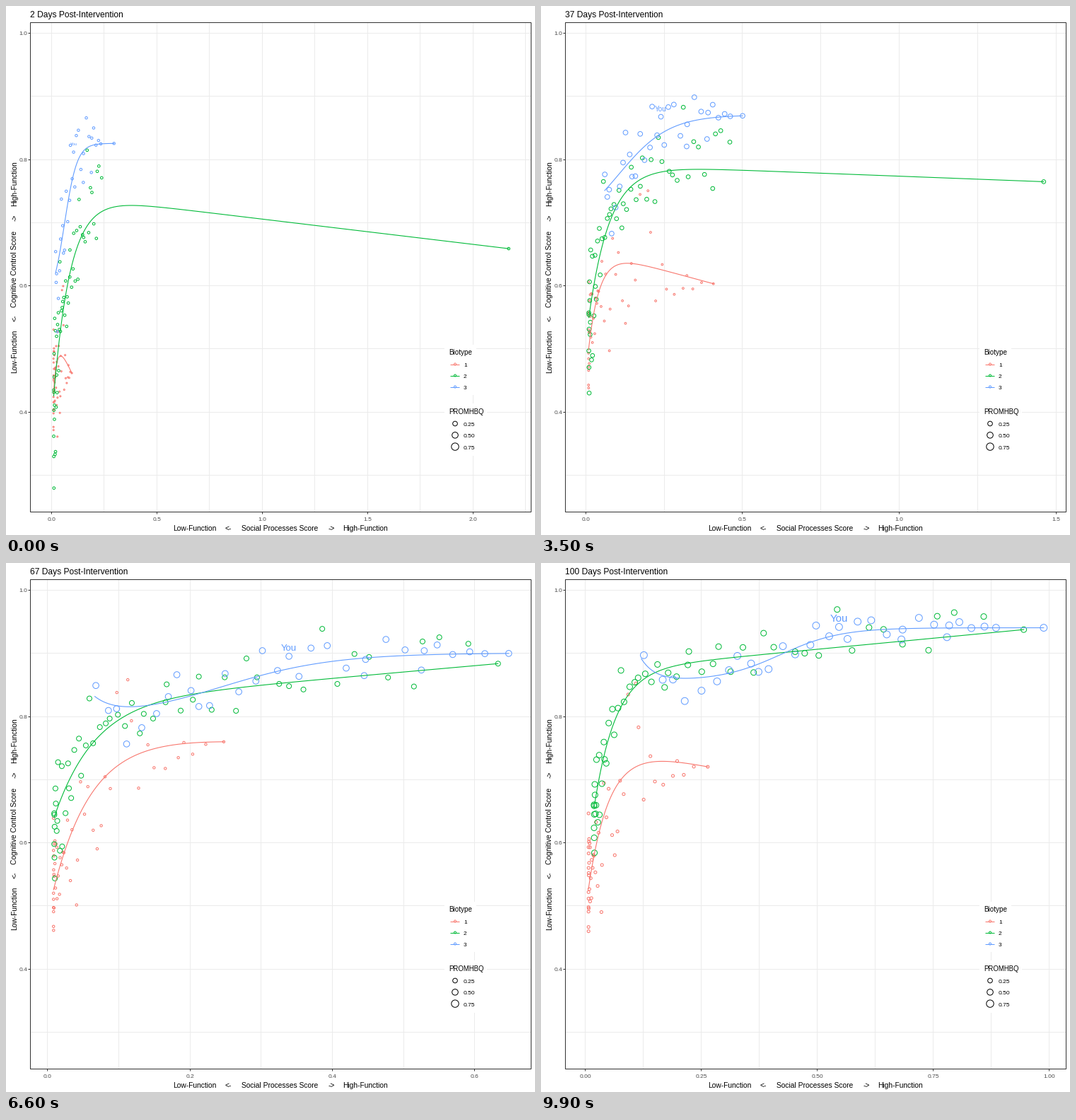
A matplotlib script for the animation above (10000 ms loop, 748 by 748 pixels).

```python
import numpy as np
import matplotlib.pyplot as plt
from matplotlib.animation import FuncAnimation
from matplotlib.collections import LineCollection
from matplotlib.patches import Rectangle

plt.rcParams["font.family"] = "Liberation Sans"

SIZE, DPI, FRAMES = 748, 100, 100
PT = 72 / DPI                                         # points per pixel
LEFT, RIGHT, TOP, BOTTOM = 34.5, 742.5, 22.5, 714.5   # panel
GRID, DARK, TICK = "#ebebeb", "#333333", "#4d4d4d"
RED, GREEN, BLUE = "#f8766d", "#00ba38", "#619cff"

# Trend parameters at these frames, interpolated between them
KEYS = [0, 12, 27, 43, 66, 84, 99]

# columns: first x, last x, first y, plateau, slope, rise length
RED_KEYS = [
    (.008, .095, .428, .530, -.72, .016),
    (.008, .115, .470, .587, -.80, .020),
    (.008, .377, .490, .598, -.09, .020),
    (.008, .435, .505, .717, -.18, .050),
    (.008, .247, .525, .775, -.05, .055),
    (.007, .280, .503, .778, -.19, .045),
    (.006, .263, .527, .760, -.15, .045),
]
GREEN_KEYS = [
    (.009, 2.168, .425, .745, -.040, .080),
    (.009, 2.155, .469, .753, -.029, .059),
    (.009, 1.620, .548, .777, -.018, .072),
    (.009, 1.297, .550, .807, -.020, .062),
    (.009, .632, .640, .820, .100, .056),
    (.009, .797, .612, .850, .090, .042),
    (.018, .944, .655, .871, .070, .046),
]
# columns: first x, last x, low, high, middle, width, bump at the start
BLUE_KEYS = [
    (.018, .295, .570, .825, .06, .030, 0),
    (.030, .375, .500, .840, .03, .050, 0),
    (.046, .457, .630, .855, .06, .060, 0),
    (.073, .541, .735, .885, .15, .100, 0),
    (.066, .647, .790, .900, .24, .080, .03),
    (.073, .849, .835, .920, .33, .055, .03),
    (.120, .987, .855, .940, .42, .065, .035),
]


def rise(x, first, last, start, top, slope, length):
    """Exponential approach to a sloped plateau."""
    gap = top + slope * first - start
    return top + slope * x - gap * np.exp(-(x - first) / length)


def step_up(x, first, last, low, high, mid, width, bump):
    """Logistic step, with a small bump that fades from the first x."""
    return (low + (high - low) / (1 + np.exp(-(x - mid) / width))
            + bump * np.exp(-(x - first) / .03))


def ramp(i, *values):
    """Value at frame i, passing evenly through the given values."""
    return np.interp(i, np.linspace(0, FRAMES - 1, len(values)), values)


def to_px(x, lim):
    return LEFT + .5 + (x - lim[0]) / (lim[1] - lim[0]) * (RIGHT - LEFT)


def to_py(y):
    return 38 + 892.8 * (1 - y)


def area(radius):
    return (2 * radius * PT) ** 2


class Group:
    """A cloud of people scattered about a moving trend."""

    def __init__(self, color, shape, keys, count, skew, spread, radii, straggler=None):
        self.color, self.shape, self.keys = color, shape, np.array(keys)
        self.skew, self.spread, self.radii = skew, spread, radii
        rng = np.random.default_rng(count)
        self.rank = (np.arange(count) + rng.random(count)) / count
        self.noise = np.clip(rng.normal(size=count), -2, 2)
        self.noise[-1] = 0
        if straggler:
            self.noise[count // 10] = straggler
        self.dots = ax.scatter([], [], facecolors="none", edgecolors=color,
                               linewidths=PT, zorder=2)
        self.line, = ax.plot([], [], color=color, lw=1.1 * PT, zorder=3)

    def solve(self, i):
        p = [np.interp(i, KEYS, col) for col in self.keys.T]
        first, last = p[:2]
        reach = min(last, .25 + .0068 * i)
        x = first + (reach - first) * self.rank ** ramp(i, *self.skew)
        x[-1] = last
        y = self.shape(x, *p) + ramp(i, *self.spread) * self.noise
        cx = first + (last - first) * np.linspace(0, 1, 120) ** 2.5
        return x, y, cx, self.shape(cx, *p)

    def draw(self, i, lim, x, y, cx, cy):
        self.dots.set_offsets(np.c_[to_px(x, lim), to_py(y)])
        self.dots.set_sizes([area(ramp(i, *self.radii))])
        self.line.set_data(to_px(cx, lim), to_py(cy))


def tick_step(lo, hi):
    """Nicest step for about five ticks, counted from zero."""
    best, choice = -np.inf, None
    for rank, step in enumerate((.1, .5, .2, .25, .4, .3)):
        for n in range(1, 9):
            top = n * step
            cover = 1 - .5 * ((hi - top) ** 2 + lo ** 2) / (.1 * (hi - lo)) ** 2
            ratio = (max(top, hi) - lo) / 4 / step
            score = .25 * (1 - rank / 5) + .2 * cover + .5 * (2 - max(ratio, 1 / ratio))
            if score > best:
                best, choice = score, step
    return choice


fig = plt.figure(figsize=(SIZE / DPI, SIZE / DPI), dpi=DPI, facecolor="white")
ax = fig.add_axes([0, 0, 1, 1])
ax.set(xlim=(0, SIZE), ylim=(SIZE, 0))
ax.axis("off")


def label(x, y, s, px, color="black", **kw):
    return ax.text(x, y, s, fontsize=px * PT, color=color, va="baseline", **kw)


def rule(xs, ys, color, z):
    ax.plot(xs, ys, color=color, lw=PT, zorder=z, solid_capstyle="butt")


def key_ring(y, radius, color):
    ax.scatter([635], [y], s=area(radius), facecolors="none", edgecolors=color,
               linewidths=PT, zorder=6)


# fixed grid, border and axis titles
for n in range(3, 11):
    y = round(to_py(n / 10)) - .5
    rule([LEFT, RIGHT], [y, y], GRID, 0)
    if n % 2 == 0:
        rule([LEFT - 3.5, LEFT], [y, y], DARK, 4)
        label(30.5, y + 3.5, f"{n / 10:.1f}", 8.4, TICK, ha="right")
ax.add_patch(Rectangle((LEFT, TOP), RIGHT - LEFT, BOTTOM - TOP, fill=False,
                       ec=DARK, lw=PT, zorder=4))

ENDS = ("Low-Function", "<-", "", "->", "High-Function")
for x, y, s in zip((236, 310, 333, 456, 476), (519, 446, 426, 304, 283), ENDS):
    label(x, 742, s or "Social Processes Score", 10.3)
    label(15, y, s or "Cognitive Control Score", 10.3, rotation=90, rotation_mode="anchor")

# legends
for y, w, h in ((479, 45, 71), (562, 60, 74)):
    ax.add_patch(Rectangle((620, y), w, h, fc="white", ec="none", zorder=5))
label(626, 493, "Biotype", 9.9, zorder=6)
label(626, 577, "PROMHBQ", 9.6, zorder=6)
for n, color in enumerate((RED, GREEN, BLUE)):
    y = 506.5 + 16 * n
    rule([628, 641], [y, y], color, 6)
    key_ring(y, 1.5, color)
    label(647, y + 3.5, str(n + 1), 8.4, zorder=6)
for n, radius in enumerate((3.3, 4.3, 5.2)):
    y = 590.5 + 16.3 * n
    key_ring(y, radius, "black")
    label(647, y + 3.5, f"{(n + 1) / 4:.2f}", 8.4, zorder=6)

# moving parts
title = label(34.5, 16, "", 12.05)
grid = ax.add_collection(LineCollection([], colors=GRID, linewidths=PT, zorder=0))
ticks = ax.add_collection(LineCollection([], colors=DARK, linewidths=PT, zorder=4))
tick_labels = [label(0, 728, "", 8.4, TICK, ha="center") for _ in range(8)]
groups = [
    Group(RED, rise, RED_KEYS, 52, (3, 4.3), (.06, .07), (1, 1.5, 2)),
    Group(GREEN, rise, GREEN_KEYS, 56, (2.3, 3), (.06, .03), (1.8, 3.2, 4), -2.5),
    Group(BLUE, step_up, BLUE_KEYS, 32, (1.5, .95), (.035, .012), (1.7, 4, 4.9), -3),
]
blue = groups[-1]
ME = len(blue.rank) // 2
blue.noise[ME] = 1
you = ax.text(0, 0, "You", color=BLUE, ha="center", va="center", zorder=3)


def draw_axis(lim):
    step = tick_step(*lim)
    lines, marks = [], []
    for t in tick_labels:
        t.set_text("")
    for n in range(24):
        x = round(to_px(n * step / 2, lim)) - .5
        if x > RIGHT:
            break
        lines.append([(x, TOP), (x, BOTTOM)])
        if n % 2 == 0:
            marks.append([(x, BOTTOM), (x, BOTTOM + 3.5)])
            t = tick_labels[n // 2]
            t.set_x(x)
            t.set_text(f"{n * step / 2:.{2 if step == .25 else 1}f}")
    grid.set_segments(lines)
    ticks.set_segments(marks)


def update(i):
    states = [g.solve(i) for g in groups]
    lo = min(s[0].min() for s in states)
    hi = max(s[0].max() for s in states)
    pad = .05 * (hi - lo)
    lim = lo - pad, hi + pad
    draw_axis(lim)
    title.set_text(f"{round(2 + 98 * i / (FRAMES - 1))} Days Post-Intervention")
    for g, state in zip(groups, states):
        g.draw(i, lim, *state)
    x, y = states[-1][:2]
    you.set_position((to_px(x[ME], lim), to_py(y[ME]) - 11))
    you.set_fontsize(min(15, 6 + .11 * i) * PT)
    return []


anim = FuncAnimation(fig, update, frames=FRAMES, interval=100, repeat=True,
                     repeat_delay=0, blit=False, init_func=lambda: [])
plt.show()
```
